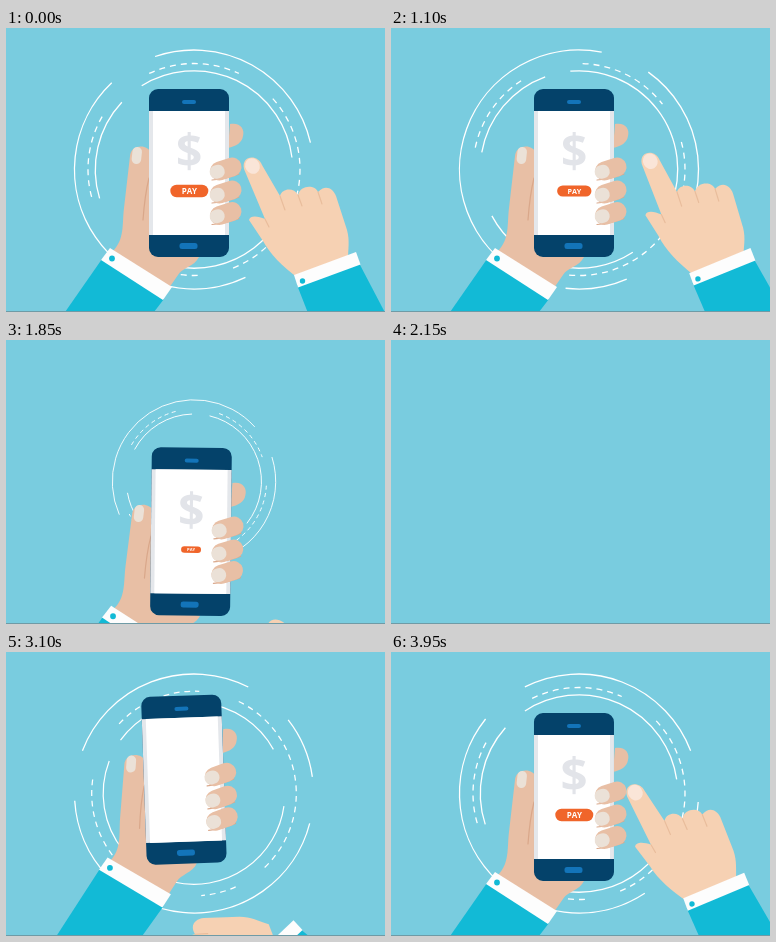
Animation, 379 px wide and 284 px high, one loop 4000 ms. Source, as an HTML page:

```html
<!DOCTYPE html>
<html lang="en">
<head>
<meta charset="utf-8">
<title>Mobile payment</title>
<style>
  html, body { margin: 0; width: 100%; height: 100%; overflow: hidden; background: #79ccdf; }
  svg { display: block; width: 100vw; height: 100vh; }
  text { font-family: "Open Sans", "Noto Sans", sans-serif; font-weight: 700; text-anchor: middle; }
  .ring { fill: none; stroke: #fff; stroke-width: 1.3; }
  .dash { stroke-dasharray: 6 5; }
  .sleeve { fill: #12bad6; }
  .cuff { fill: #fdfdfd; }
  .navy { fill: #04426a; }
  .blue { fill: #1374b9; }
  .skin { fill: #e8bfa5; }
  .skin2 { fill: #f6d1b3; }
  .nail { fill: #ebe1d7; }
  .nail2 { fill: #fae5d8; }
  .finger { stroke: #e8bfa5; stroke-width: 19; stroke-linecap: round; }
  .shade { fill: none; stroke: #d9a78a; stroke-width: 1.2; stroke-linecap: round; }
  .fold { fill: none; stroke: #e9bd9c; stroke-width: 1.2; stroke-linecap: round; }
  .orange { fill: #f0652a; }
  #burst { stroke: #f0652a; stroke-width: 1.3; stroke-linecap: round; }
</style>
</head>
<body>
<svg viewBox="0 0 379 284" preserveAspectRatio="none">
  <rect width="379" height="284" fill="#79ccdf"/>
  <g id="rings"></g>

  <g id="left">
    <path class="sleeve" d="M96 231 L-5 376 H77 L158 271 Z"/>
    <path class="skin" d="M224 96 C234 94 239 101 237 108 C236 115 230 118 222 120 Z"/>
    <path class="skin" d="M124 128 C125 116 142 116 145 125 L150 135 V222 L193 229 C188 239 177 239 172 247 L163 260 L106 224 C119 212 116 196 118 180 Z"/>
    <path class="shade" d="M143 150 C139 166 138 178 137 192"/>
    <rect class="nail" x="126" y="119" width="9.5" height="17" rx="4.7" transform="rotate(6 131 128)"/>
    <path class="cuff" d="M104 220 L166 259 L157 272 L95 232 Z"/>
    <circle class="sleeve" cx="106" cy="230.500" r="2.900"/>

    <rect class="navy" x="143" y="61" width="80" height="168" rx="9"/>
    <rect x="143" y="83" width="80" height="124" fill="#e4e7eb"/>
    <rect x="147" y="83" width="72" height="124" fill="#fff"/>
    <rect class="blue" x="176" y="72" width="14" height="4" rx="2"/>
    <rect class="blue" x="173.500" y="215" width="18" height="6" rx="2.500"/>

    <g id="dollar"><text y="16.500" font-size="46" fill="#e2e4e9">$</text></g>
    <g id="burst"></g>
    <g id="button">
      <rect class="orange" x="-19" y="-6.200" width="38" height="12.400" rx="6.200"/>
      <text x=".2" y="2.900" font-size="8" letter-spacing=".3" fill="#fff">PAY</text>
    </g>
    <g id="fingers"></g>
  </g>

  <g id="right">
    <g id="hand">
      <path class="skin2" d="M238 141 C235 127 252 126 256 137 L274 168
        C276 160 288 159 292 167 C294 157 309 156 312 164 C319 156 327 160 330 168
        L341 202 C344 213 342 221 342 232 L318 250 L292 250
        C276 238 264 226 257 213 L243 192 C244 187 252 188 259 191 Z"/>
      <path class="fold" d="M274 168 L279 182 M292 167 L296 178 M312 164 L316 176 M259 191 L263 199"/>
      <ellipse class="nail2" cx="246.500" cy="138" rx="7.200" ry="8" transform="rotate(-30 246.500 138)"/>
    </g>
    <g id="arm">
      <path class="sleeve" d="M291 257 L331 359 H418 L353 235 Z"/>
      <path class="cuff" d="M288 247 L350 224 L354.500 236.500 L292 259.500 Z"/>
      <circle class="sleeve" cx="296.500" cy="253" r="2.700"/>
    </g>
  </g>
  <rect y="283" width="379" height="1" fill="#6f9ba6"/>
</svg>
<script>
const LOOP = 4000, STEP = 50;
const $ = id => document.getElementById(id);
const put = (el, tf) => el.setAttribute('transform', tf);

function add(parent, tag, attrs) {
  const el = document.createElementNS('http://www.w3.org/2000/svg', tag);
  for (const k in attrs) el.setAttribute(k, attrs[k]);
  parent.appendChild(el);
  return el;
}

// Smooth curve through rows of [time, ...values] that never overshoots its keys
function track(rows) {
  const n = rows.length - 1;
  const slope = (i, c) => (rows[i + 1][c] - rows[i][c]) / (rows[i + 1][0] - rows[i][0]);
  const tangent = (i, c) => {
    if (i === 0 || i === n) return 0;
    const a = slope(i - 1, c), b = slope(i, c);
    return a * b > 0 ? 2 * a * b / (a + b) : 0;
  };
  return t => {
    let i = 0;
    while (i < n - 1 && t >= rows[i + 1][0]) i++;
    const d = rows[i + 1][0] - rows[i][0];
    const u = Math.min(1, Math.max(0, (t - rows[i][0]) / d)), v = 1 - u;
    return rows[i].slice(1).map((p, k) => {
      const c = k + 1;
      return p * v * v * (1 + 2 * u) + rows[i + 1][c] * u * u * (3 - 2 * u)
        + d * u * v * (v * tangent(i, c) - u * tangent(i + 1, c));
    });
  };
}

function arc(r, from, to) {
  const at = a => [Math.cos(a * Math.PI / 180) * r, Math.sin(a * Math.PI / 180) * r].map(v => v.toFixed(2));
  return `M${at(from)} A${r} ${r} 0 ${to - from > 180 ? 1 : 0} 1 ${at(to)}`;
}

// dx, dy, tilt
const leftPose = track([
  [0, 0, 0, 0], [400, 0, 0, 0], [550, 0, 1.5, 1.2], [650, 0, 1, 1], [950, 0, 0, 0], [1200, 0, 0, 0],
  [1600, 1, -14, 0], [1650, 1, -16, 0], [1750, 1, -8, 0], [2120, 0, 250, 4],
  [2750, 0, 250, 6], [3050, -1.4, -17, -2.2], [3100, -1.4, -15.5, -2], [3450, 0, 0, -.4], [3550, 0, 0, -.3], [4000, 0, 0, 0]
]);
// wrist x, wrist y, arm angle, hand angle
const rightPose = track([
  [0, 319, 242, 0, 0], [450, 257, 270, 9, 12], [650, 294, 250, 6.5, 10], [1000, 328, 239, -1, 2],
  [1300, 330, 240, -3, 1], [1600, 320, 270, -4, 4], [1900, 305, 370, -20, -40], [2150, 290, 470, -30, -70],
  [2750, 200, 430, -40, -110], [3100, 266, 297, -23, -74], [3430, 340, 234, 9, 31],
  [3550, 338, 236, 8, 27], [3950, 323, 240, -2.5, -3.5], [4000, 319, 242, 0, 0]
]);
const buttonSize = track([
  [0, 1], [400, 1], [480, .86], [600, 1.08], [650, 1.06], [850, 1], [3350, 0], [3550, .85], [3680, 1.06], [3800, 1], [4000, 1]
]);
const dollarSize = track([[3520, 0], [3550, .03], [3850, 1.07], [3950, 1.03], [4000, 1]]);

const rings = [
  { r: 119.5, arcs: [[-109, -13], [12, 42], [64.5, 226.5]], speed: .0495, lag: 110, grow: [3080, 1] },
  { r: 106, arcs: [[-42, 70], [-115, -65], [165, 212], [88, 108]], speed: .0245, lag: 0, grow: [3100, .965], dash: true },
  { r: 98.7, arcs: [[-122, -7], [30, 125], [163, 223]], speed: .0245, lag: 0, grow: [3100, .92] }
];
for (const ring of rings) {
  ring.el = add($('rings'), 'path', {
    class: ring.dash ? 'ring dash' : 'ring',
    d: ring.arcs.map(a => arc(ring.r, ...a)).join(' ')
  });
  ring.size = track([[0, 1], [1700, 1], [2100, 0], [2750, 0], ring.grow, [3250, 1], [4000, 1]]);
}

for (const y of [143, 166, 187.5]) {
  add($('fingers'), 'path', { class: 'shade', d: `M206 ${y + 9} Q220 ${y + 8} 233 ${y + 3}` });
  add($('fingers'), 'line', { class: 'finger', x1: 213.5, y1: y, x2: 226, y2: y - 4 });
  add($('fingers'), 'rect', {
    class: 'nail', x: 203.5, y: y - 6, width: 15, height: 13.5, rx: 6.5, transform: `rotate(-15 211 ${y})`
  });
}

const rays = [];
for (let i = 0; i < 8; i++) {
  const a = i * Math.PI / 4;
  rays.push({ x: Math.cos(a) * 23, y: Math.sin(a) * 19, el: add($('burst'), 'line', {}) });
}

function drawBurst(t) {
  const u = (t - 480) / 320, on = u > 0 && u < 1;
  $('burst').style.display = on ? '' : 'none';
  if (!on) return;
  const outer = .7 + .45 * Math.sqrt(u), inner = outer - .8 * u * (1 - u);
  for (const { x, y, el } of rays) {
    el.setAttribute('x1', x * inner); el.setAttribute('y1', y * inner);
    el.setAttribute('x2', x * outer); el.setAttribute('y2', y * outer);
  }
}

function draw(t) {
  for (const ring of rings) {
    const s = ring.size(t)[0];
    const turn = t < 2400 ? ring.speed * t : ring.speed * (t - LOOP - ring.lag);
    ring.el.style.display = s > .01 ? '' : 'none';
    put(ring.el, `translate(188 141.500) rotate(${turn}) scale(${s})`);
  }
  const [dx, dy, tilt] = leftPose(t);
  put($('left'), `translate(${dx} ${dy}) rotate(${tilt} 130 250)`);
  const [x, y, arm, hand] = rightPose(t);
  put($('right'), `translate(${x - 319} ${y - 242})`);
  put($('arm'), `rotate(${arm} 319 242)`);
  put($('hand'), `rotate(${hand} 319 242)`);

  const early = t < 2400;
  put($('button'), `translate(183.300 163) scale(${early || t >= 3350 ? buttonSize(t)[0] : 0})`);
  put($('dollar'), `translate(183 123) scale(${early ? 1 : dollarSize(t)[0]})`);
  put($('burst'), 'translate(183.300 163)');
  drawBurst(t);

  const shown = t < 2150 || t >= 2750;
  for (const id of ['rings', 'left', 'right']) $(id).style.display = shown ? '' : 'none';
}

const start = performance.now();
function tick() {
  const t = (performance.now() - start) % LOOP;
  draw(Math.floor(t / STEP) * STEP);
  requestAnimationFrame(tick);
}
tick();
</script>
</body>
</html>
```
